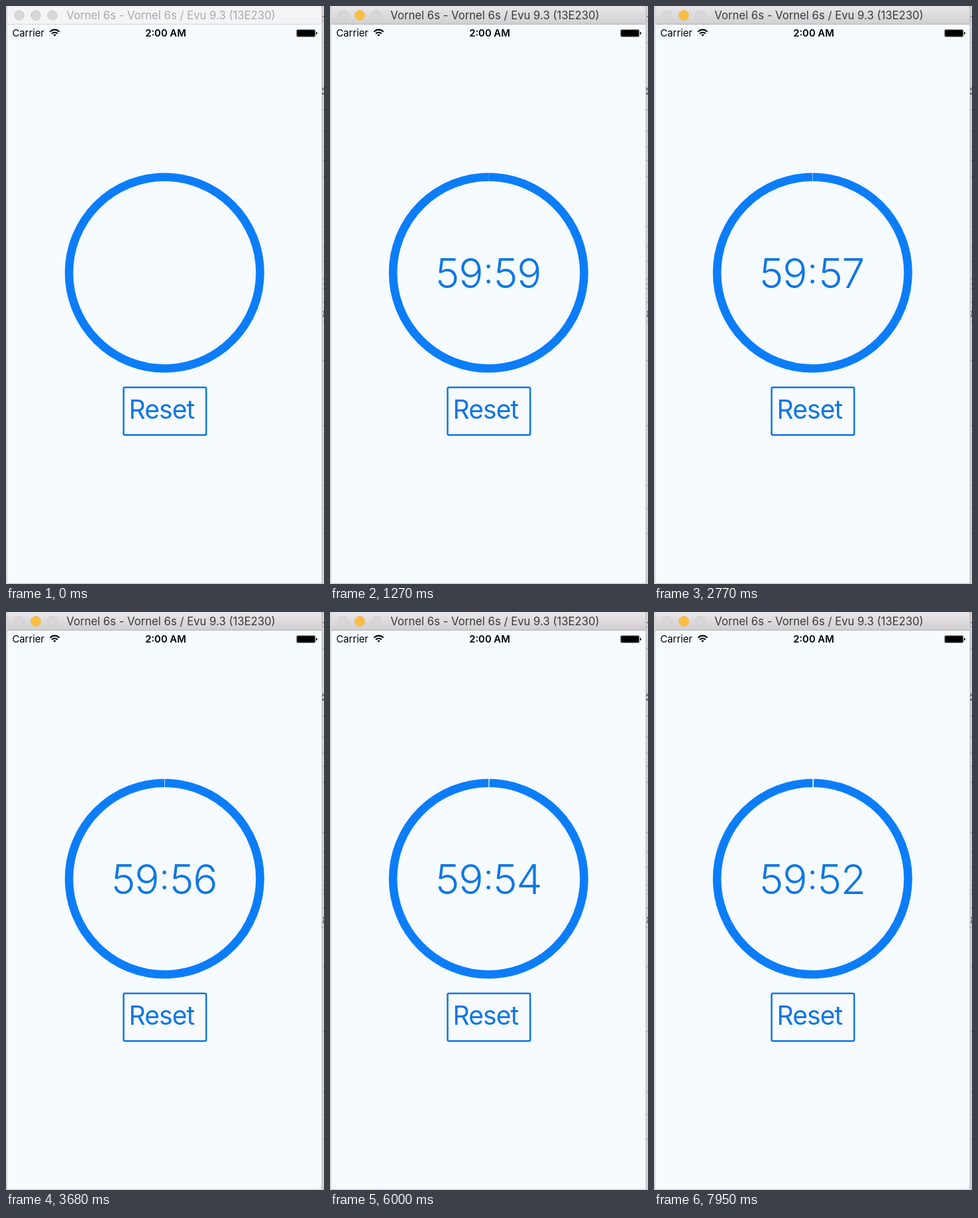
An HTML page that plays this animation: 480x871 px, repeating every 8 s.

```html
<!DOCTYPE html>
<html lang="en">
<head>
<meta charset="utf-8">
<title>Countdown</title>
<style>
  html, body { margin: 0; width: 100%; height: 100%; overflow: hidden; background: #d9d9db; }
  svg { display: block; width: 480px; height: 871px; font-family: Inter, Roboto, sans-serif; }
  .idle { fill: #d8d6d8; stroke: #cbc9cb; stroke-width: .8; }
  .digits { font-size: 62px; font-weight: 300; fill: #0f76e4; text-anchor: middle; letter-spacing: -1.2px; }
</style>
</head>
<body>
<svg viewBox="0 0 480 871">
  <defs>
    <linearGradient id="activeBar" x2="0" y2="1">
      <stop stop-color="#e9e7e9"/><stop offset="1" stop-color="#d0ced0"/>
    </linearGradient>
    <linearGradient id="shade">
      <stop stop-color="#b4b4b6"/><stop offset="1" stop-color="#dedee0"/>
    </linearGradient>
  </defs>

  <!-- desktop behind the window -->
  <rect width="480" height="871" fill="#d4d4d7"/>
  <rect x="476" width="4" height="871" fill="url(#shade)"/>
  <g id="edgeLines" stroke="#a2a2a5"></g>
  <path d="M477 125h3M477 132h3" stroke="#858588" stroke-width="4"/>
  <path d="M478 16h2M478 461l2 -1v4l-2 4h2" stroke="#444" fill="none"/>

  <!-- simulator window -->
  <rect x="2" y="27" width="474.5" height="842.5" fill="#f5fbff"/>
  <path id="bar" d="M2 28V4q0-4 4-4H472.5q4 0 4 4V28z"/>
  <path id="barLine" d="M2 27.5H476.5"/>
  <circle class="idle" cx="20" cy="14" r="7.3"/>
  <circle id="yellow" cx="45" cy="14" r="7.4" stroke-width=".8"/>
  <circle class="idle" cx="70" cy="14" r="7.3"/>
  <text id="title" x="249" y="20" font-size="16.7" text-anchor="middle">Vornel 6s - Vornel 6s / Evu 9.3 (13E230)</text>

  <!-- status bar -->
  <text x="9.5" y="46" font-size="14.8">Carrier</text>
  <text x="241" y="46" font-size="14.8" font-weight="600" text-anchor="middle">2:00 AM</text>
  <g fill="none" stroke="#000" stroke-width="2">
    <path d="M66.3 38.8q7.2 -6.4 14.4 0M69 41.6q4.5 -3.8 9 0"/>
    <path d="M71.3 43.3q2.2 -1.6 4.4 0l-2.2 2.5z" fill="#000" stroke="none"/>
  </g>
  <rect x="438.5" y="35.5" width="28.500" height="11" rx="2" fill="#777" stroke="#777" stroke-width=".6"/>
  <rect x="439.500" y="36.300" width="26.500" height="9.400" rx="1"/>
  <path d="M468 39q1.8 0 1.8 2t-1.8 2z"/>

  <!-- timer -->
  <circle id="ring" cx="239.3" cy="402" r="144.200" pathLength="3600" transform="rotate(-90 239.3 402)"
          fill="none" stroke="#0c7df9" stroke-width="12.600"/>
  <g id="clock" class="digits">
    <text id="minutes" x="195" y="424.500"></text>
    <text x="238.500" y="417.500" font-size="54">:</text>
    <text id="seconds" x="283" y="424.500"></text>
  </g>

  <rect x="177.500" y="574.800" width="124.700" height="71.700" rx="2" fill="#f7fbff" stroke="#0f76e4" stroke-width="2.500"/>
  <text x="185.500" y="622" font-size="39" letter-spacing="-.9" fill="#0f76e4">Reset</text>
</svg>
<script>
  const LOOP = 8000, ACTIVATE = 330, START = 660, TOTAL = 3600;
  const get = id => document.getElementById(id);
  const paint = (id, attrs) => {
    for (const name in attrs) get(id).setAttribute(name, attrs[name]);
  };
  const pad = n => String(n).padStart(2, '0');

  get('edgeLines').innerHTML =
    [22, 55, 156, 188, 212, 232, 256, 332, 362, 384, 411, 418, 425, 446, 475, 534, 632, 722, 757, 794]
      .map(y => `<path d="M477 ${y + .5}h3"/>`).join('');

  function render(time) {
    const active = time >= ACTIVATE;
    paint('bar', { fill: active ? 'url(#activeBar)' : '#f5f3f5' });
    paint('barLine', { stroke: active ? '#b5b3b5' : '#d6d4d6' });
    paint('yellow', { fill: active ? '#fdbe41' : '#d8d6d8', stroke: active ? '#f0b544' : '#cbc9cb' });
    paint('title', { fill: active ? '#3a393a' : '#aaa8aa' });

    const running = time >= START;
    const elapsed = running ? (time - START) / 1000 : 0;
    const left = TOTAL - 1 - Math.floor(elapsed);
    paint('ring', { 'stroke-dasharray': running ? `0 ${elapsed} ${TOTAL}` : 'none' });
    paint('clock', { visibility: running ? 'visible' : 'hidden' });
    get('minutes').textContent = pad(Math.floor(left / 60));
    get('seconds').textContent = pad(left % 60);
  }

  const origin = performance.now();
  function tick() {
    render((performance.now() - origin) % LOOP);
    requestAnimationFrame(tick);
  }
  tick();
</script>
</body>
</html>
```
